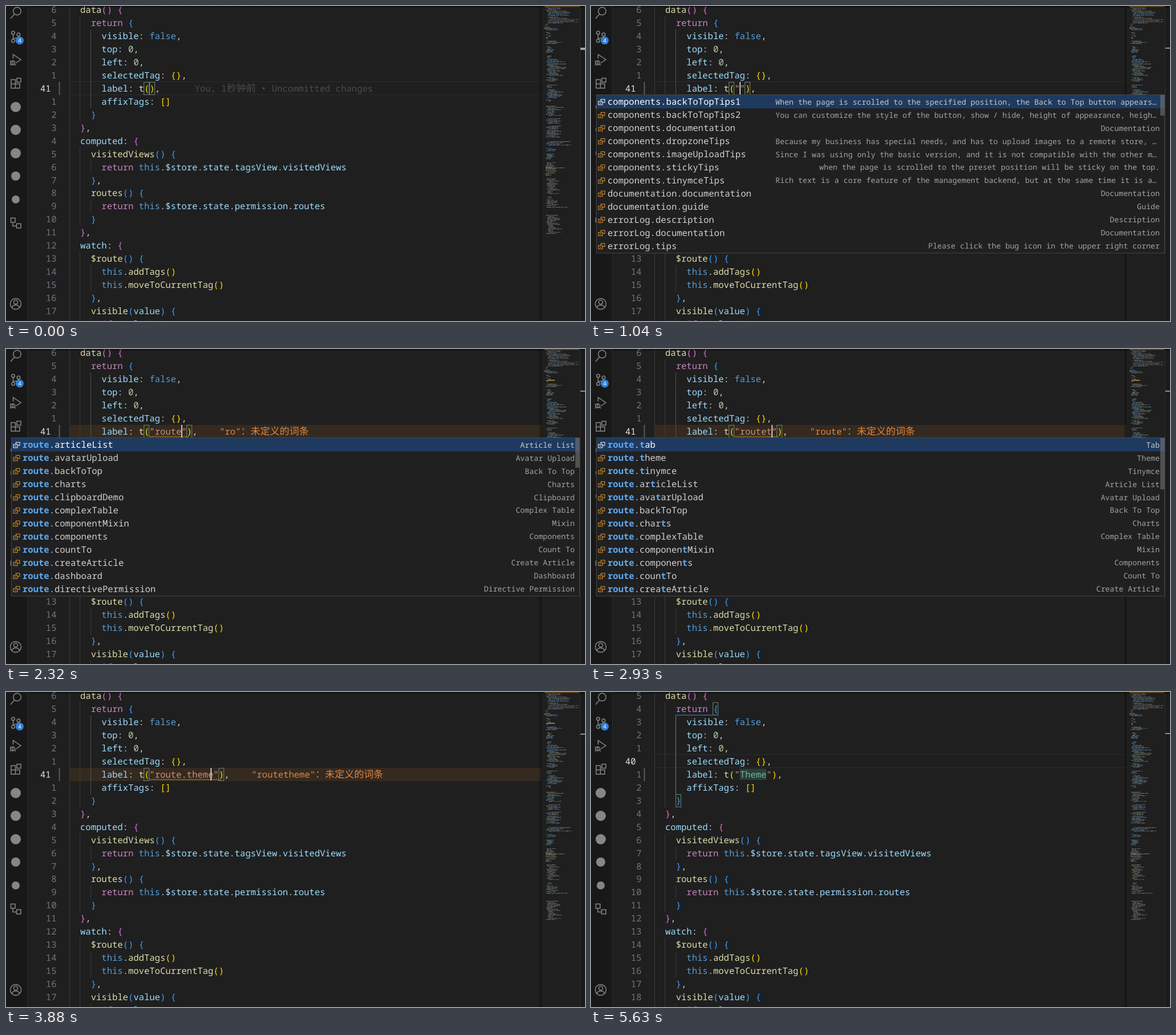
These frames come from a looping animation (1014x552 px, 5830 ms). An HTML page:

```html
<!DOCTYPE html>
<html lang="en">
<head>
<meta charset="utf-8">
<title>Editor completion</title>
<style>
  html, body { margin: 0; width: 100%; height: 100%; overflow: hidden; background: #1f1f1f; }
  svg { display: block; width: 1014px; height: 552px; }
  text {
    font: 500 15.556px "Noto Sans Mono", "DejaVu Sans Mono", monospace;
    white-space: pre;
    text-rendering: geometricPrecision;
  }
  .cjk { font-family: "Noto Sans CJK SC", "Noto Sans CJK", sans-serif; font-size: 17px; font-weight: 400; }
  text.detail { font-size: 13.25px; }
  text.ui { font: 9.7px "Noto Sans", "Noto Sans CJK SC", "Noto Sans CJK", sans-serif; }
  text.ui .cjk { font-size: 9.7px; }
  .hit { font-weight: 700; fill: #5caaf2; }
  .icons { fill: none; stroke: #868686; stroke-width: 1.5; }
  .icons .solid { fill: #868686; stroke: none; }
</style>
</head>
<body>
<svg viewBox="0 0 1014 552" xmlns="http://www.w3.org/2000/svg">
  <defs>
    <linearGradient id="down" x2="0" y2="1">
      <stop stop-color="#000" stop-opacity=".55"/><stop offset="1" stop-color="#000" stop-opacity="0"/>
    </linearGradient>
    <linearGradient id="side">
      <stop stop-color="#000" stop-opacity="0"/><stop offset="1" stop-color="#000" stop-opacity=".4"/>
    </linearGradient>
  </defs>
  <rect width="1014" height="552" fill="#1f1f1f"/>
  <rect width="37" height="552" fill="#181818"/>
  <path d="M37.5 0V552" stroke="#2b2b2b"/>
  <g class="icons">
    <circle cx="19.500" cy="9" r="6.800"/><path d="M15 14L8 22"/>
    <circle cx="12.500" cy="47" r="2.800"/><circle cx="12.500" cy="61" r="2.800"/><circle cx="22" cy="50" r="2.800"/>
    <path d="M12.500 50V58M22 53Q22 56 13 57"/>
    <path d="M12.500 92V85L26 94L17 100"/>
    <circle cx="12" cy="99.500" r="3.500"/><path d="M12 96V103M7 96L9 98M7 100H8.500M7 104L9 102M17 104L15 102"/>
    <path d="M9 129H16.500V144H9ZM9 136.500H24V144H16.500M19 126.500H26V133.500H19Z"/>
    <circle class="solid" cx="17" cy="177" r="9"/>
    <circle class="solid" cx="17" cy="217" r="9"/>
    <circle class="solid" cx="17" cy="258" r="9"/>
    <circle class="solid" cx="17" cy="298" r="8"/>
    <circle class="solid" cx="17" cy="339" r="7"/>
    <path d="M8.500 371.500H16V379H8.500ZM18.500 381.500H26V389H18.500ZM12 379V385.500H18.500"/>
    <circle cx="17" cy="522" r="9.500"/><circle cx="17" cy="519" r="3.500"/><path d="M10.500 529Q11 524 17 524T23.500 529"/>
  </g>
  <circle cx="24" cy="60.500" r="7" fill="#2f7fd6"/>
  <text class="ui" x="24" y="63.800" text-anchor="middle" fill="#fff">4</text>
  <g id="scene"></g>
  <rect id="caret" width="1.600" height="22" fill="#e6e6e6"/>
</svg>
<script>
const LOOP = 5830, CHAR = 9.333, LINE = 22.957, LEFT = 111.33;
const ARG_X = LEFT + 15 * CHAR;
const ORANGE = '#ce9178', PLAIN = '#d4d4d4', GOLD = '#ffd700';
const BRACKETS = [GOLD, '#da70d6', '#359fff'];
const rowTop = i => -4.6 + LINE * i;
const colX = c => LEFT + c * CHAR;

const rect = (x, y, w, h, fill, stroke = 'none') =>
  `<rect x="${x}" y="${y}" width="${w}" height="${h}" fill="${fill}" stroke="${stroke}"/>`;
const line = (d, color) => `<path d="${d}" fill="none" stroke="${color}"/>`;
const span = (s, fill) => `<tspan fill="${fill}">${s}</tspan>`;
const text = (x, y, s, fill, attrs = '') =>
  `<text x="${x}" y="${y}" fill="${fill}" ${attrs}>` +
  s.replace(/[\u2e80-\uffef]+/g, '<tspan class="cjk">$&</tspan>') + '</text>';
const bracketBox = (x, row) =>
  rect(Math.floor(x) + .5, Math.round(rowTop(row)) + .5, 9, 22, 'rgba(0,100,0,.1)', '#777');

const SOURCE = `  data() {
    return {
      visible: false,
      top: 0,
      left: 0,
      selectedTag: {},
      label: t
      affixTags: []
    }
  },
  computed: {
    visitedViews() {
      return this.$store.state.tagsView.visitedViews
    },
    routes() {
      return this.$store.state.permission.routes
    }
  },
  watch: {
    $route() {
      this.addTags()
      this.moveToCurrentTag()
    },
    visible(value) {
      if (value) {`.split('\n');

let depth = 1;
function colorOf(token, rest) {
  if ('({['.includes(token)) return BRACKETS[depth++ % 3];
  if (')}]'.includes(token)) return BRACKETS[--depth % 3];
  if (/^(return|if)$/.test(token)) return '#c586c0';
  if (/^(this|false)$/.test(token)) return '#569cd6';
  if (/^\d/.test(token)) return '#b5cea8';
  if (/^[\w$]/.test(token)) return rest[0] === '(' || token === 't' ? '#dcdcaa' : '#9cdcfe';
  return PLAIN;
}

function drawCode() {
  let out = '';
  SOURCE.forEach((src, i) => {
    const indent = src.search(/\S/);
    for (let c = 0; c < indent; c += 2) {
      const x = Math.floor(colX(c)) + .5;
      out += line(`M${x} ${rowTop(i)}V${rowTop(i + 1)}`, c === 4 && i > 1 && i < 8 ? '#505050' : '#393939');
    }
    const body = src.replace(/[\w$]+|[^\w\s$]/g, (token, at) => span(token, colorOf(token, src.slice(at + token.length))));
    out += text(colX(indent), rowTop(i) + 16.7, body.trimStart(), PLAIN);
  });
  return out;
}

// y, rows, indent, longest line
const BLOCKS = [
  [2, 3, 2, 42], [8, 5, 4, 42], [19, 2, 5, 50], [23, 4, 6, 54], [31, 3, 1, 5], [37, 3, 0, 24],
  [46, 6, 3, 8], [61, 3, 2, 30], [71, 3, 3, 8], [76, 3, 3, 16], [87, 3, 2, 8], [93, 15, 4, 34],
  [125, 4, 3, 24], [138, 3, 3, 22], [146, 8, 3, 30], [164, 2, 3, 10], [175, 9, 3, 28], [197, 5, 3, 30],
  [210, 3, 3, 24], [217, 7, 3, 44], [237, 4, 3, 54], [249, 3, 3, 16], [259, 5, 3, 16], [274, 12, 2, 20],
  [283, 1, 1, 58], [302, 14, 4, 22], [334, 2, 2, 10], [339, 6, 3, 20], [352, 1, 2, 52], [366, 17, 3, 24]
];
function drawMinimap() {
  let seed = 41;
  const random = () => (seed = seed * 16807 % 2147483647) / 2147483647;
  const script = ['#9cdcfe', '#dcdcaa', '#b8b8b8', '#569cd6', '#9cdcfe'];
  const markup = ['#569cd6', '#9cdcfe', ORANGE, '#9a9a9a'];
  const style = ['#9cdcfe', '#d7ba7d', '#9a9a9a', '#b8b8b8'];
  let out = rect(932, 0, 6, 552, 'url(#side)') + rect(1005, 0, 9, 552, '#1b1b1b') +
    line('M1005.5 0V552', '#303030') + rect(943, 0, 61, 1.6, '#b57a25');
  for (const [y, rows, indent, longest] of BLOCKS) {
    const palette = y < 36 ? markup : y < 272 ? script : style;
    for (let r = 0; r < rows; r++) {
      let x = 943 + indent + 2 * Math.floor(random() * 3);
      const end = Math.min(1003, x + longest * (.35 + .65 * random()));
      while (x < end) {
        const w = Math.min(end - x, 2 + random() * 7);
        out += `<rect x="${x.toFixed(1)}" y="${y + r * 2}" width="${w.toFixed(1)}" height="1.2" opacity=".45" fill="${palette[Math.floor(random() * palette.length)]}"/>`;
        x += w + 1;
      }
    }
  }
  return out;
}
const BACKDROP = drawCode() + drawMinimap() + rect(38, 0, 976, 4, 'url(#down)');

const routes = names => names.split(' ').map(name => 'route.' + name);
const LISTS = {
  all: ('components.backToTopTips1 components.backToTopTips2 components.documentation components.dropzoneTips ' +
    'components.imageUploadTips components.stickyTips components.tinymceTips documentation.documentation ' +
    'documentation.guide errorLog.description errorLog.documentation errorLog.tips').split(' '),
  route: routes('articleList avatarUpload backToTop charts clipboardDemo complexTable componentMixin ' +
    'components countTo createArticle dashboard directivePermission'),
  tail: routes('tab theme tinymce articleList avatarUpload backToTop charts complexTable ' +
    'componentMixin components countTo createArticle'),
  theme: ['route.theme', 'components.tinymceTips']
};
const DETAILS = {
  clipboardDemo: 'Clipboard', componentMixin: 'Mixin', tips: 'Please click the bug icon in the upper right corner',
  backToTopTips1: 'When the page is scrolled to the specified position, the Back to Top button appears in the lower right corner',
  backToTopTips2: 'You can customize the style of the button, show / hide, height of appearance, height of the return',
  dropzoneTips: 'Because my business has special needs, and has to upload images to a remote store, I wrote it by myself',
  imageUploadTips: 'Since I was using only the basic version, and it is not compatible with the other modules, I changed it',
  stickyTips: 'when the page is scrolled to the preset position will be sticky on the top.',
  tinymceTips: 'Rich text is a core feature of the management backend, but at the same time it is a place with lots of pits'
};
const titleOf = key => DETAILS[key] ||
  key.replace(/[A-Z]/g, ' $&').replace(/^./, c => c.toUpperCase());

function highlight(label, query) {
  const rest = [...(label.startsWith('route') ? query : query.slice(7))];
  return [...label].map(c => c === rest[0] ? (rest.shift(), `<tspan class="hit">${c}</tspan>`) : c).join('');
}

function drawPopup({ list, query, thumb }) {
  const items = LISTS[list];
  let out = rect(9.5, 155.5, 995, items.length * LINE + 2, '#202020', '#454545') +
    rect(10, 156, 994, LINE + .5, '#1e3a5f');
  items.forEach((label, i) => {
    const y = 156.5 + i * LINE, color = i ? '#e0962e' : '#ffffff';
    let detail = titleOf(label.split('.')[1]);
    if (detail.length > 84) detail = detail.slice(0, 83) + '…';
    const long = detail.endsWith('…');
    out += rect(17.5, y + 7, 6.5, 5.5, 'none', color) +
      rect(13, y + 10.5, 7, 6, i ? '#202020' : '#1e3a5f', color) + line(`M15 ${y + 13.5}H18`, color) +
      text(29, y + 16.9, highlight(label, query), i ? '#d0d0d0' : '#ffffff') +
      text(long ? 323 : 996, y + 16.2, detail, i ? '#a3a3a3' : '#c8c8c8',
        `class="detail" text-anchor="${long ? 'start' : 'end'}"`);
  });
  return out + (thumb ? rect(997, 156, 7.5, thumb, 'rgba(130,130,130,.5)') : '');
}

function drawToolbar() {
  return rect(260.5, 102.5, 158, 29.5, '#202020', '#454545') +
    line('M276 113.5L271 118L276 122.5M311 113.5L316 118L311 122.5', '#808080') +
    text(325, 121.6, '接受', PLAIN, 'class="ui"') + text(349, 121.6, '接受 Word', PLAIN, 'class="ui"') +
    [400.5, 405, 409.5].map(x => rect(x - .8, 117, 1.7, 1.7, PLAIN)).join('');
}

function squiggle(x, width) {
  let d = `M${x} 153.5`;
  for (let i = 0; i < width / 4; i++) d += 'q1 -2.500 2 0t2 0';
  return line(d, '#bd9a2c');
}

function drawLabel(s) {
  const shown = s.theme ? '"Theme"' : s.arg;
  const closeX = ARG_X + shown.length * CHAR, endX = closeX + 2 * CHAR, base = rowTop(6) + 16.7;
  let out = '';
  if (s.word) out += rect(ARG_X + CHAR, 133.5, 11 * CHAR, 22, '#4a4a4a');
  if (s.theme) out += rect(ARG_X + CHAR, 134.5, 5 * CHAR, 19.5, '#2b3f3a');
  let body = span(shown, ORANGE);
  if (s.ghost) body = span('"', ORANGE) + `<tspan fill="#8c6753" font-style="italic">${shown.slice(1, -1)}</tspan>` + span('"', ORANGE);
  if (s.theme) body = span('"', ORANGE) + span('Theme', '#72b29b') + span('"', ORANGE);
  if (s.row === 6) out += bracketBox(ARG_X - CHAR, 6) + bracketBox(closeX, 6);
  out += text(ARG_X - CHAR, base, span('(', GOLD) + body + span(')', GOLD) + ',', PLAIN);
  if (s.ghost) out += line(`M${ARG_X} 155.5H${closeX}`, '#8a8a8a');
  if (s.warn) out += squiggle(ARG_X, shown.length * CHAR) + text(endX + 38.6, base, `"${s.warn}"：未定义的词条`, '#e0873f');
  if (s.blame) out += text(endX + 60.5, base, 'You, 1秒钟前 • Uncommitted changes', '#4b4b4b');
  return out;
}

function drawNumbers(row) {
  return SOURCE.map((_, i) => i === row
    ? text(60, rowTop(i) + 16.7, String(35 + i), '#e0e0e0')
    : text(88.5, rowTop(i) + 16.7, String(Math.abs(i - row)), '#6e7681', 'text-anchor="end"')).join('');
}

function drawScene(s) {
  const y = Math.round(rowTop(s.row));
  let out = s.warn ? rect(112, y, 826, 23, '#352a20') : line(`M112 ${y - .5}H937M112 ${y + 22.5}H937`, '#2b2b2b');
  out += BACKDROP + drawNumbers(s.row) + rect(92.5, 133, 2, 23, '#5a5a55') + drawLabel(s);
  if (s.guide) out += line('M214 40.500H148.500V179.500', '#4b7fbd') + bracketBox(colX(11), 1) + bracketBox(colX(4), 8);
  const thick = s.blame || s.word;
  out += rect(1006, s.row === 6 ? 73 : 72, 8, thick ? 4 : 1.5, thick ? '#a8a8a8' : '#b8b8b8');
  if (s.warn) out += rect(948, 54, 13, 1.6, '#b5913a');
  if (s.bulb) out += '<circle cx="117" cy="138" r="4.500" fill="#f5c518"/>' + rect(115, 142, 4, 3, '#f5c518') +
    '<path d="M121 139l1 2.500 2.500 1-2.500 1-1 2.500-1-2.500-2.500-1 2.500-1z" fill="#f5c518" stroke="#352a20" stroke-width=".5"/>';
  if (s.list) out += drawPopup(s);
  if (s.ghost) out += drawToolbar();
  return out;
}

// Each step changes only the named properties; typed text sets arg and query together.
const typed = (query, at, more) => ({ arg: `"${query}"`, query, at, ...more });
const STEPS = [
  [0, { arg: '', query: '', at: 0, row: 6, blame: true }],
  [970, { arg: '"tagsView.tagsView"', at: .4, ghost: true }],
  [1040, typed('', 1, { ghost: false, blame: false, list: 'all', thumb: 36 })],
  [1570, typed('r', 2, { list: 'route', thumb: 44 })],
  [1840, typed('ro', 2.5)],
  [1910, { at: 3, thumb: 46 }],
  [1980, typed('rou', 3.5)],
  [2050, { at: 4, warn: 'r', thumb: 52 }],
  [2120, typed('rout', 4.5)],
  [2190, { at: 5 }],
  [2320, typed('route', 6, { warn: 'ro' })],
  [2520, { warn: 'route' }],
  [2800, typed('routet', 6.5)],
  [2870, { at: 7, list: 'tail', thumb: 90 }],
  [2940, typed('routeth', 7.5)],
  [3010, { at: 8, list: 'theme', thumb: 0 }],
  [3080, typed('routethe', 8.5, { warn: 'routet' })],
  [3150, { at: 9 }],
  [3200, { bulb: true, warn: 'routeth' }],
  [3270, typed('routethem', 9.07)],
  [3340, { at: 10 }],
  [3410, typed('routetheme', 10.5)],
  [3480, { at: 11 }],
  [3610, { warn: 'routethem' }],
  [3680, { warn: 'routetheme' }],
  [3880, typed('route.theme', 11.5, { list: '', bulb: false })],
  [3950, { at: 12 }],
  [4280, { warn: '', word: true }],
  [4610, { row: 5, at: 7, word: false }],
  [4680, { guide: true }],
  [4750, { theme: true }]
];
let merged = {};
const states = STEPS.map(([time, change]) => ({ time, ...(merged = { ...merged, ...change }) }));

function fade(t, start) {
  const k = Math.min(1, Math.max(0, (Math.floor((t - start) / 70) + 1) / 5));
  return k * k * (3 - 2 * k);
}
const caretOpacity = t => t < 690 ? fade(t, 130) : t < 970 ? 1 - fade(t, 690) : 1 - fade(t, 5350);

const scene = document.getElementById('scene'), caret = document.getElementById('caret');
let current;
function play() {
  const t = performance.now() % LOOP;
  const state = states.findLast(s => s.time <= t);
  if (state !== current) {
    current = state;
    scene.innerHTML = drawScene(state);
    caret.setAttribute('x', ARG_X + state.at * CHAR - .4);
    caret.setAttribute('y', Math.round(rowTop(state.row)));
  }
  caret.setAttribute('opacity', caretOpacity(t));
  requestAnimationFrame(play);
}
play();
</script>
</body>
</html>
```
